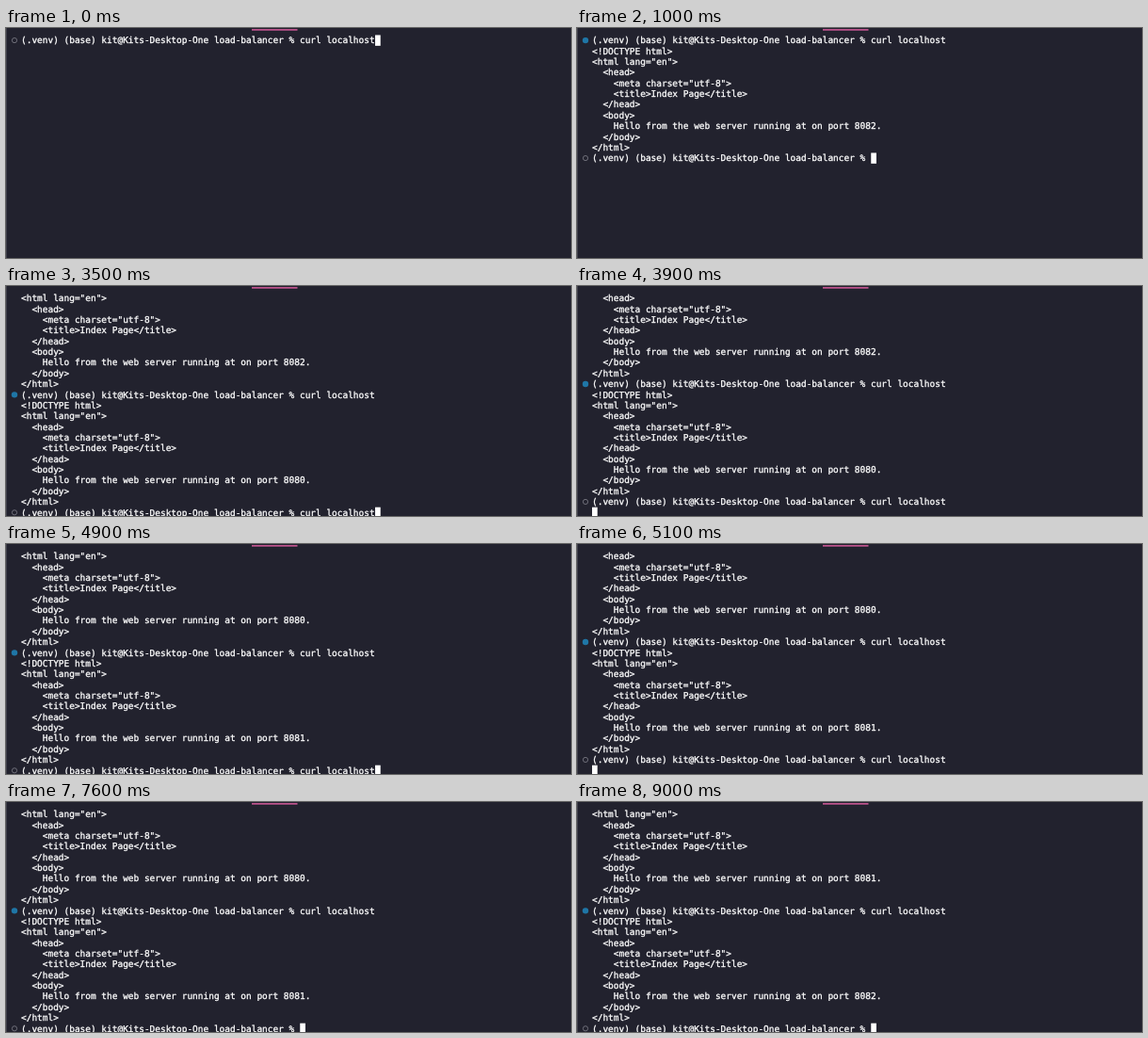
An HTML page with a canvas for the animation above (9.1 s loop, 600x244 px).

```html
<!DOCTYPE html>
<html lang="en">
<head>
<meta charset="utf-8">
<title>Terminal</title>
<style>
  html, body { margin: 0; width: 100%; height: 100%; overflow: hidden; background: #22222e; }
  canvas { display: block; width: 600px; height: 244px; }
</style>
</head>
<body>
<canvas id="stage" width="600" height="244"></canvas>
<script>
const ctx = document.getElementById('stage').getContext('2d');

const LOOP = 9100;
const LEFT = 16, TOP = 7.5, ROW = 11.36, CHAR = 5.697, ROWS = 21;
const FONT = '9.463px "DejaVu Sans Mono", monospace';
const BG = '#22222e', EDGE = '#41414c', INK = '#ffffff';
const PINK = '#b8528a', BLUE = '#1f76a6', GRAY = '#777780';

const PROMPT = '(.venv) (base) kit@Kits-Desktop-One load-balancer % ';
const COMMAND = 'curl localhost';
const PORTS = [8082, 8080, 8081];

// When each command appears, is entered and gets its reply, in ms.
const REQUESTS = [
  { typed: 0, enter: 700, reply: 800 },
  { typed: 1600, enter: 2100, reply: 2200 },
  { typed: 3300, enter: 3800, reply: 4000 },
  { typed: 4700, enter: 5100, reply: 5200 },
  { typed: 5800, enter: 6200, reply: 6200 },
  { typed: 7100, enter: 7500, reply: 7500 },
  { typed: 8500, enter: 8900, reply: 8900 }
];

const page = port => [
  '<!DOCTYPE html>',
  '<html lang="en">',
  '  <head>',
  '    <meta charset="utf-8">',
  '    <title>Index Page</title>',
  '  </head>',
  '  <body>',
  `    Hello from the web server running at on port ${port}.`,
  '  </body>',
  '</html>'
].map(text => ({ text }));

function linesAt(t) {
  const lines = [];
  for (const [i, req] of REQUESTS.entries()) {
    if (t < req.reply) {
      lines.push({ text: PROMPT + (t >= req.typed ? COMMAND : ''), dot: 'open' });
      if (t >= req.enter) lines.push({ text: '' });
      return lines;
    }
    lines.push({ text: PROMPT + COMMAND, dot: 'done' }, ...page(PORTS[i % PORTS.length]));
  }
  lines.push({ text: PROMPT, dot: 'open' });
  return lines;
}

function drawDot(kind, y) {
  ctx.beginPath();
  ctx.arc(9, y, kind === 'done' ? 3.2 : 2.6, 0, Math.PI * 2);
  if (kind === 'done') {
    ctx.fillStyle = BLUE;
    ctx.fill();
  } else {
    ctx.strokeStyle = GRAY;
    ctx.lineWidth = 0.9;
    ctx.stroke();
  }
}

// A hairline outline gives the letters a slightly heavier weight.
function drawText(text, y) {
  ctx.fillStyle = ctx.strokeStyle = INK;
  ctx.lineWidth = 0.3;
  ctx.fillText(text, LEFT, y);
  ctx.strokeText(text, LEFT, y);
}

function draw(t) {
  ctx.fillStyle = BG;
  ctx.fillRect(0, 0, 600, 244);
  ctx.fillStyle = EDGE;
  ctx.fillRect(0, 0, 1, 244);
  ctx.fillStyle = PINK;
  ctx.fillRect(261, 1, 48.5, 1.8);

  ctx.font = FONT;
  ctx.textRendering = 'geometricPrecision';
  ctx.textBaseline = 'alphabetic';
  ctx.lineJoin = 'round';
  const visible = linesAt(t).slice(-ROWS);
  visible.forEach(({ text, dot }, row) => {
    const y = TOP + row * ROW;
    if (dot) drawDot(dot, y + 5.6);
    drawText(text, y + 8.8);
  });

  const last = visible.length - 1;
  ctx.fillStyle = INK;
  ctx.fillRect(LEFT + visible[last].text.length * CHAR, TOP + last * ROW, CHAR, ROW);
}

const start = performance.now();
function tick() {
  draw((performance.now() - start) % LOOP);
  requestAnimationFrame(tick);
}
tick();
</script>
</body>
</html>
```
